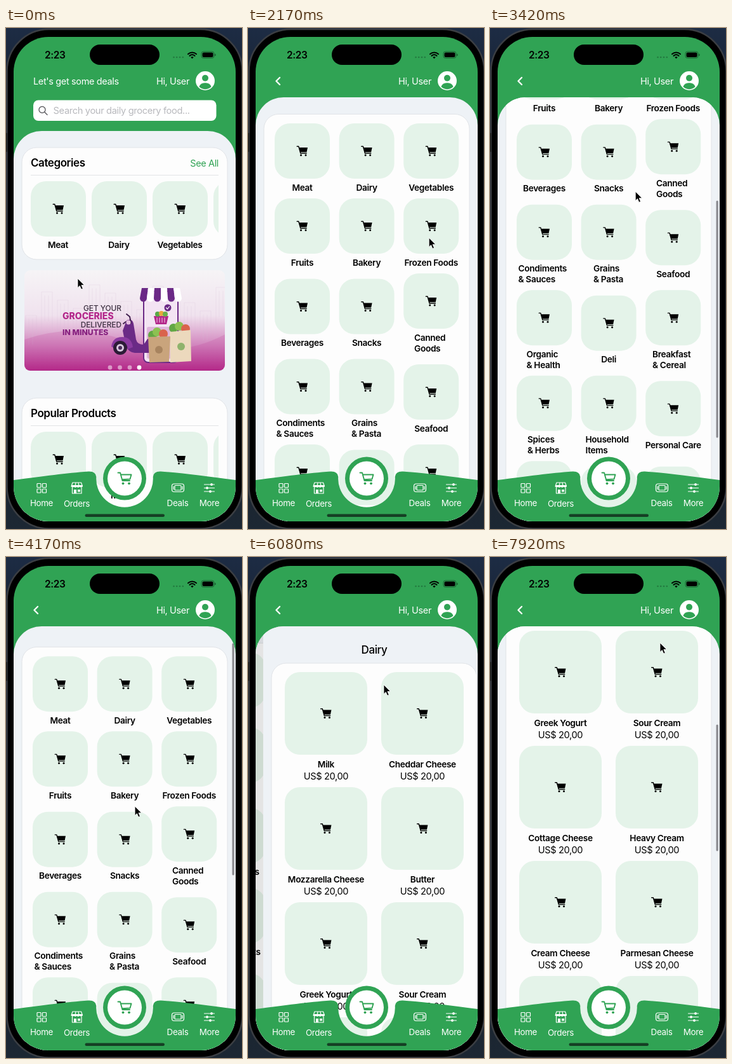
Write an HTML page that moves like this. It is 372x788 px and loops after 8 s.

```html
<!DOCTYPE html>
<html lang="en">
<head>
<meta charset="utf-8">
<title>Grocery app</title>
<style>
html, body { margin: 0; height: 100%; overflow: hidden; background: #000; }
svg { display: block; width: 372px; height: 788px; }
text { font-family: Inter, Roboto, sans-serif; letter-spacing: -.025em; white-space: pre; }
.ad text { letter-spacing: 0; }
</style>
</head>
<body>
<svg id="stage" viewBox="0 0 372 788"></svg>
<script>
const GREEN = '#30a354', TILE = '#e4f3e9', SHEET = '#eef2f6', PURPLE = '#6b2a86', PINK = '#b3268a';

const rect = (x, y, w, h, r, fill, more = '') =>
  `<rect x="${x}" y="${y}" width="${w}" height="${h}" rx="${r}" fill="${fill}" ${more}/>`;
const circle = (x, y, r, fill, more = '') => `<circle cx="${x}" cy="${y}" r="${r}" fill="${fill}" ${more}/>`;
const path = (d, fill, more = '') => `<path d="${d}" fill="${fill}" ${more}/>`;
const line = (d, color, w = 1.2) => path(d, 'none', `stroke="${color}" stroke-width="${w}" stroke-linecap="round" stroke-linejoin="round"`);
const text = (x, y, s, size, weight = 400, fill = '#000', anchor = 'start') =>
  `<text x="${x}" y="${y}" font-size="${size}" font-weight="${weight}" fill="${fill}" text-anchor="${anchor}">${s}</text>`;
const label = (x, y, s) => text(x, y, s, 13.7, 600, '#000', 'middle');
const card = (y, h) => rect(25, y, 324, h, 23, '#fdfdfd', 'stroke="#e0e3e7"');
const tile = (x, y, size) => rect(x, y, size, size, 24, TILE) +
  `<use href="#cart" x="${x + size / 2}" y="${y + size / 2}"/>`;

// Home page
function shelf(y, title, names) {
  return text(39, y + 30, title, 17, 600) + rect(39, y + 43, 296, 1, 0, '#e2e4e6') +
    `<g clip-path="url(#shelf)">` + names.map((n, i) =>
      tile(39 + 96 * i, y + 53, 87) + label(82 + 96 * i, y + 158, n)).join('') + '</g>';
}

function banner() {
  let city = '';
  for (let i = 0; i < 13; i++) {
    const h = 28 + (i * 37 % 50), x = 31 + i * 25;
    city += `M${x} 480V${480 - h}h17V480M${x + 5} ${486 - h}v40M${x + 11} ${486 - h}v40`;
  }
  let awning = '';
  for (let i = 0; i < 6; i++)
    awning += path(`M${214 + i * 10} 409h10l${i < 3 ? -2 + i : i - 2} 16a5.5 5.5 0 0 1 -11 0z`, i % 2 ? '#fff' : PURPLE);
  return `<g class="ad" clip-path="url(#ad)">` + rect(29, 381, 316, 158, 0, 'url(#adSky)') +
    `<g opacity=".35">${line(city, '#d9c3d6', .7)}</g>` +
    path('M29 490Q110 462 190 492T345 482V539H29Z', '#b3268a', 'opacity=".16"') +
    text(182, 445, 'GET YOUR', 11.8, 500, '#3c3040', 'end') +
    text(89, 458, 'GROCERIES', 14, 800, PINK) +
    text(182, 471, 'DELIVERED', 11.8, 500, '#3c3040', 'end') +
    text(89, 483, 'IN MINUTES', 12.2, 800, '#86207f') +
    rect(217, 414, 54, 112, 7, '#f3e4f3', `stroke="${PURPLE}" stroke-width="2"`) +
    rect(222, 470, 44, 50, 3, '#dfb5dc') + awning +
    circle(255, 440, 5.5, PURPLE) + line('M252.5 440l2 2 3-4', '#fff') +
    path('M233 453h23l-3 13h-17z', PINK) + line('M238 456v7M242 456v7M246 456v7M250 456v7', '#f3d2ec', 1) +
    circle(239, 450, 4, '#58a846') + circle(245, 449, 4, '#e8a63c') + circle(251, 450, 4, '#6ab04c') +
    // scooter
    path('M190 460q9-4 11 5l4 25q2 8 12 8l6-9h20l2 22h-42q-12-1-15-15l-4-20z', PURPLE) +
    path('M166 501q2-15 17-15t17 16l-8 3q-1-10-10-10t-11 9z', '#8b3aa0') +
    circle(180, 503, 11, '#2c1b36') + circle(180, 503, 6, '#d8c9df') + circle(180, 503, 3, '#4b2b5b') +
    line('M197 464l-2-10-5-4M189 462l-4 3', '#42204f', 2) + circle(193, 463, 3.5, '#e6bfe0') +
    // bags
    [[231, 483], [238, 478], [248, 481], [264, 472], [273, 469], [283, 473]].map(([x, y], i) =>
      circle(x, y, 7, ['#62a744', '#8cc152', '#d9634c'][i % 3])).join('') +
    path('M258 478l33-3 1 49-33 2z', '#ecd9bd') + path('M224 486l35-1-2 40-31 1z', '#c9a47c') +
    circle(241, 506, 6, '#a8845f') + circle(276, 501, 6, '#8fb36c') +
    [164, 179.5, 195, 210].map((x, i) => circle(x, 534, 3.4, '#fff', i < 3 ? 'opacity=".5"' : '')).join('') + '</g>';
}

const homePage = rect(12, 100, 350, 690, 0, SHEET) + card(188, 176) +
  shelf(188, 'Categories', ['Meat', 'Dairy', 'Vegetables', '']) +
  text(335, 218, 'See All', 14.5, 400, GREEN, 'end') + banner() + card(582, 230) +
  shelf(582, 'Popular Products', ['Beef', 'Milk', 'Carrots', '']);

// Category page: two-line names are left aligned at the given x
const rows = [
  ['Meat', 'Dairy', 'Vegetables'],
  ['Fruits', 'Bakery', 'Frozen Foods'],
  ['Beverages', 'Snacks', 'Canned|Goods|262'],
  ['Condiments|&amp; Sauces|44.5', 'Grains|&amp; Pasta|163', 'Seafood'],
  ['Organic|&amp; Health|57.5', 'Deli', 'Breakfast|&amp; Cereal|256'],
  ['Spices|&amp; Herbs|59', 'Household|Items|150.5', 'Personal Care'],
  ['Cleaning|Supplies|57', 'Baby Care', 'Pet Food'],
];
let categories = card(135.5, 940), rowTop = 150;
for (const row of rows) {
  const tall = row.some(n => n.includes('|'));
  row.forEach((item, i) => {
    const [a, b, left] = item.split('|'), x = 42 + 101.6 * i, y = rowTop + (tall && !b ? 8.5 : 0);
    categories += tile(x, y, 87) + (b
      ? text(left, y + 105.5, a, 13.7, 600) + text(left, y + 122.5, b, 13.7, 600)
      : label(x + 43.5, y + 105.5, a));
  });
  rowTop += tall ? 134.5 : 118;
}

// Product page
const goods = ['Milk', 'Cheddar Cheese', 'Mozzarella Cheese', 'Butter', 'Greek Yogurt', 'Sour Cream',
  'Cottage Cheese', 'Heavy Cream', 'Cream Cheese', 'Parmesan Cheese', 'Whipped Cream', 'Goat Cheese'];
const products = text(187, 152, 'Dairy', 17, 500, '#000', 'middle') + card(167, 1500) + goods.map((item, i) => {
  const x = 46 + 152 * (i % 2), y = 181 + 181 * (i >> 1);
  return tile(x, y, 130) + label(x + 65, y + 150, item) +
    text(x + 65, y + 169, 'US$ 20,00', 14.6, 400, '#000', 'middle');
}).join('');

const page = (id, content) => `<g id="${id}">${rect(12, 100, 350, 690, 0, SHEET)}
  <g id="${id}List">${content}</g>${rect(356.5, 137, 3.2, 100, 1.6, '#8b8b90', `id="${id}Bar"`)}</g>`;

const phone = rect(0, 0, 372, 788, 0, 'url(#wall)') +
  rect(1.5, 2, 371, 785.5, 66, '#000', 'stroke="#3b3e43" stroke-width="2.5"') +
  rect(0, 165, 2, 30, 1, '#222') + rect(12, 14, 350, 762, 55, GREEN);

const topBar = text(61, 48, '2:23', 15.5, 600) + rect(132, 26, 110, 32, 16, '#000') +
  [264.5, 269.2, 274, 278.8].map(x => circle(x, 46, 1.3, '#237a40')).join('') +
  line('M287 41a9.5 9.5 0 0 1 13 0M289.5 43.8a5.6 5.6 0 0 1 8 0', '#000', 2) + path('M291.3 46a3.3 3.3 0 0 1 4.4 0l-2.2 2.3z', '#000') +
  rect(308, 37, 20, 10.4, 3.2, 'none', 'stroke="#1c6234"') + rect(309.5, 38.5, 17, 7.4, 2, '#000') + rect(329, 40.5, 1.5, 3.6, .7, '#1c6234') +
  text(289, 88.6, 'Hi, User', 14.5, 400, '#fff', 'end') + circle(314, 83, 15, '#fff') +
  circle(314, 78.8, 5, GREEN) + path('M304.4 92.2q2-6 9.6-6t9.6 6a13 13 0 0 1-19.2 0z', GREEN);

const homeHead = text(43, 88.6, "Let's get some deals", 14.5, 400, '#fff') + rect(43, 113.5, 288.5, 32.5, 8, '#fff') +
  circle(57, 128.5, 5, 'none', 'stroke="#606064" stroke-width="1.4"') + line('M60.8 132.3l4.2 4.2', '#606064', 1.5) +
  text(74.5, 135, 'Search your daily grocery food...', 14.7, 400, '#b8b9bd');

const box = (x, y) => rect(x, y, 6, 6, .8, 'none', 'stroke="#fff" stroke-width="1.2"');
const nav = path('M12 711C60 705 95 700 130 697.5Q141.5 697 142.3 706A44.8 44.8 0 1 0 231.7 706Q232.5 697 244 697.5C279 700 314 705 362 711V790H12Z', GREEN) +
  circle(187, 708.5, 34, GREEN) + circle(187, 708.5, 27, '#fff') +
  line('M176.5 699.5h3.5l3.5 12.5h11.5M181 702.5h16.5l-2 7-12.5 .8', GREEN, 1.9) + circle(184.5, 716.3, 1.9, GREEN) + circle(194, 716.3, 1.9, GREEN) +
  box(49, 716.5) + box(57.5, 716.5) + box(49, 725) + box(57.5, 725) +
  line('M105 715h13.5l2 6h-17.5zM104.5 723v9h14.5v-9M110 715l-1 6M114 715l1 6', '#fff') + path('M103 719h17.5v2q-1.5 3-4.4 .5-2.8 2.5-4.4 0-2.8 2.5-4.4 0-2.8 2.5-4.3-.5z', '#fff') +
  rect(107, 726, 4, 6, 0, '#fff') + rect(113, 726, 4, 3.5, 0, '#fff') +
  rect(261.5, 717, 19, 12.5, 3.5, 'none', 'stroke="#fff" stroke-width="1.2"') + rect(266, 719.5, 10, 7.5, 1, 'none', 'stroke="#fff" stroke-width="1.2"') + line('M264 721v4.5M278.2 721v4.5', '#fff') +
  line('M312.5 718h16M312.5 723.5h16M312.5 729h16', '#fff') + circle(324, 718, 1.9, '#fff') + circle(317, 723.5, 1.9, '#fff') + circle(322, 729, 1.9, '#fff') +
  [['Home', 56, 752], ['Orders', 111.5, 753], ['Deals', 270.5, 751.5], ['More', 320.5, 751.5]]
    .map(([s, x, y]) => text(x, y, s, 13.4, 400, '#fff', 'middle')).join('') +
  rect(124.5, 764.5, 125.5, 4.6, 2.3, '#153f24');

const $ = id => document.getElementById(id);
$('stage').innerHTML = `<defs>
  <linearGradient id="wall" x2="0" y2="1"><stop stop-color="#1d2c44"/><stop offset=".3" stop-color="#10151d"/><stop offset="1" stop-color="#1c2733"/></linearGradient>
  <linearGradient id="adSky" x2="0" y2="1"><stop stop-color="#f6f4f6"/><stop offset=".45" stop-color="#f0e2ee"/><stop offset=".75" stop-color="#d184bd"/><stop offset="1" stop-color="#b32988"/></linearGradient>
  <clipPath id="screen">${rect(12, 14, 350, 762, 55)}</clipPath>
  <clipPath id="body">${rect(12, 109, 350, 760, 44, '#000', 'id="bodyRect"')}</clipPath>
  <clipPath id="shelf">${rect(39, 180, 296, 640, 0)}</clipPath>
  <clipPath id="ad">${rect(29, 381, 316, 158, 9)}</clipPath>
  <g id="cart">${line('M-8.3 -7.3h2.6l3 10.8h9.4', '#000', 1.4)}${path('M-5.5 -5.5H8.5L7 1.8H-3.3Z', '#000')}${circle(-2, 6.5, 1.5, '#000')}${circle(5.5, 6.5, 1.5, '#000')}</g>
</defs>
${phone}
<g clip-path="url(#screen)">
  <g id="homeHead">${homeHead}</g><g id="back">${line('M50 78l-5.5 5.5 5.5 5.5', '#fff', 2.4)}</g>${topBar}
  <g clip-path="url(#body)">
    <g id="home">${homePage}</g>${rect(12, 100, 350, 690, 0, '#000', 'id="shade1"')}
    ${page('cats', categories)}${rect(12, 100, 350, 690, 0, '#000', 'id="shade2"')}
    ${page('prods', products)}
  </g>
  ${nav}
</g>
<g id="cursor">${path('M0 0V14.5L3.3 11.4 5.7 17 8.2 15.9 5.9 10.5H10.5Z', '#000', 'stroke="#fff" stroke-width=".8"')}</g>`;

const show = (id, on) => $(id).setAttribute('display', on ? 'inline' : 'none');
const move = (id, x, y = 0) => $(id).setAttribute('transform', `translate(${x} ${y})`);
const clamp = v => Math.max(0, Math.min(1, v));

// Smooth curve through [time, value...] keys, resting at every turning point
function along(keys, t, k = 1) {
  const n = keys.length - 1;
  if (t <= keys[0][0]) return keys[0][k];
  if (t >= keys[n][0]) return keys[n][k];
  const slope = i => (keys[i + 1][k] - keys[i][k]) / (keys[i + 1][0] - keys[i][0]);
  const tangent = i => {
    if (i < 1 || i >= n) return 0;
    const a = slope(i - 1), b = slope(i);
    return a * b <= 0 ? 0 : 2 * a * b / (a + b);
  };
  const i = keys.findIndex(key => key[0] > t) - 1, d = keys[i + 1][0] - keys[i][0], u = (t - keys[i][0]) / d;
  const s = u * u * (3 - 2 * u);
  return keys[i][k] * (1 - s) + keys[i + 1][k] * s +
    d * u * (1 - u) * ((1 - u) * tangent(i) - u * tangent(i + 1));
}

const pointer = [
  [0, 113, 394], [830, 312, 210], [1650, 312, 210], [2170, 285, 331], [2500, 255, 505], [2830, 244, 267],
  [2950, 240, 125], [3080, 240, 85], [3250, 235, 80], [3450, 228, 300], [3600, 222, 480], [3720, 218, 650],
  [3800, 215, 680], [4170, 203, 391], [4600, 175, 310], [5330, 214, 201], [6083, 214, 201], [6500, 258, 525],
  [6720, 262, 523], [7167, 263, 308], [7420, 266, 142], [7917, 268, 135]];
const catScroll = [[2500, 0], [2830, 238], [2950, 380], [3080, 420], [3250, 420], [3450, 200], [3600, 20],
  [3720, -70], [3800, -75], [4170, -6], [4400, 0]];
const prodScroll = [[6720, 0], [7167, 215], [7420, 390], [7917, 427]];

// Share of the width a pushed page still has to travel
const remaining = (t, start) => {
  const u = Math.max(0, t - start) * .0166;
  return (1 + u) * Math.exp(-u);
};

function bar(id, offset, ratio, length, opacity) {
  const el = $(id + 'Bar');
  el.setAttribute('y', 135.5 + ratio * Math.max(0, offset));
  el.setAttribute('height', Math.max(20, length + 1.3 * Math.min(0, offset)));
  el.setAttribute('opacity', opacity);
}

function draw(t) {
  const first = remaining(t, 1285), second = remaining(t, 5770);
  const atHome = t < 1300;
  show('homeHead', atHome);
  show('back', !atHome);
  $('bodyRect').setAttribute('y', atHome ? 162 : 109);

  show('home', t < 2150);
  move('home', -105 * (1 - (atHome ? 1 : first)), atHome ? 0 : -53);
  $('shade1').setAttribute('opacity', atHome ? 0 : .1 * (1 - first));
  show('cats', !atHome);
  move('cats', 350 * first - 105 * (1 - second));
  $('shade2').setAttribute('opacity', .1 * (1 - second));
  show('prods', t > 5770);
  move('prods', 350 * second);

  const a = along(catScroll, t), b = along(prodScroll, t);
  move('catsList', 0, -a);
  move('prodsList', 0, -b);
  bar('cats', a, .56, 373, clamp((t - 2500) / 100) * clamp((4580 - t) / 200));
  bar('prods', b, .3, 199, clamp((t - 6720) / 100));
  move('cursor', along(pointer, t), along(pointer, t, 2));
}

function tick(now) {
  draw(Math.floor(now % 8000 * .012 + .05) / .012);
  requestAnimationFrame(tick);
}
draw(0);
requestAnimationFrame(tick);
</script>
</body>
</html>
```
